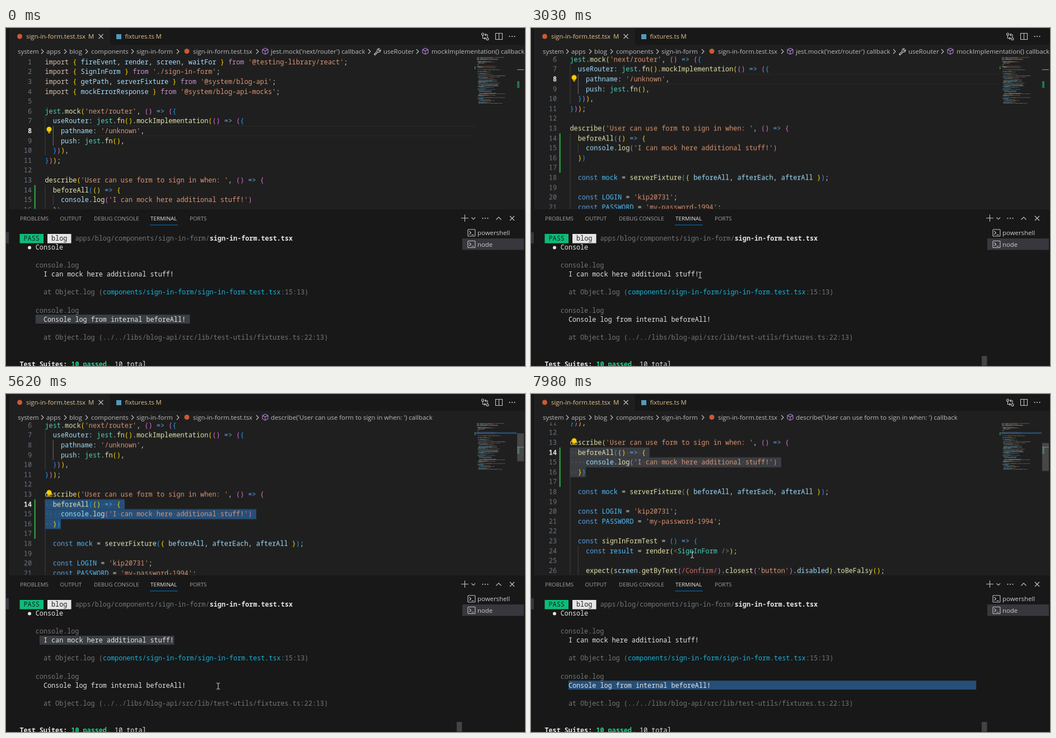
Animation of 927 by 604 pixels, one loop 8000 ms. Source, as an HTML page:

```html
<!DOCTYPE html>
<html lang="en">
<head>
<meta charset="utf-8">
<title>Editor and test output</title>
<style>
html, body { margin: 0; width: 100%; height: 100%; overflow: hidden; background: #181818; }
svg { display: block; width: 100vw; height: 100vh; }
text { white-space: pre; }
.ui { font-family: 'Open Sans', 'Noto Sans', sans-serif; font-size: 11.4px; fill: #bcbcbc; }
.tabs { font-family: 'Open Sans', 'Noto Sans', sans-serif; font-size: 9.85px; fill: #a2a2a2; }
.code { font: 500 11.87px 'Noto Sans Mono', 'DejaVu Sans Mono', monospace; fill: #d4d4d4; }
.term { font: 500 11.78px 'Noto Sans Mono', 'DejaVu Sans Mono', monospace; fill: #e5e5e5; }
.line { fill: none; stroke: #c5c5c5; stroke-width: 1.1; }
.mod { fill: #e2c08d; }
.cube { fill: none; stroke: #b180d7; stroke-width: 1.1; }

/* One loop is 8 s, so 1% is 80 ms. */
.k { animation: 8s step-end infinite; }
.scroll { animation-name: scroll; }
.before { animation-name: before; }
.caret16 { animation-name: caret16; }
.after { animation-name: after; }
.bulb8 { animation-name: bulb8; }
.bulb14 { animation-name: bulb14; }
.crumb1 { animation-name: crumb1; }
.crumb2 { animation-name: crumb2; }
.pick { animation-name: pick; }
.row16 { animation-name: row16; }
.row15 { animation-name: row15; }
.row14 { animation-name: row14; }
.slide { animation-name: slide; }
.thumb { animation-name: thumb; animation-timing-function: linear; }
.termbar { animation-name: termbar; }
.sel1 { animation-name: sel1; }
.sel2 { animation-name: sel2; transform-box: fill-box; transform-origin: right; }
.sel2 rect { animation-name: tint; }
.sel3 { animation-name: sel3; transform-box: fill-box; transform-origin: left; }
.mouse { animation-name: mouse; animation-timing-function: ease-in-out; }
.beam { animation-name: beam; }
.hand { animation-name: hand; }
.press { animation-name: press; }

@keyframes scroll {
  0% { transform: none; }
  6.25% { transform: translateY(-92.6px); }
  93.75% { transform: translateY(-185.2px); }
}
@keyframes slide {
  0% { transform: none; }
  6.25% { transform: translateY(17.5px); }
  93.75% { transform: translateY(35px); }
}
@keyframes thumb {
  0%, 3.5% { opacity: 0; }
  4.5%, 16% { opacity: 1; }
  24%, 49% { opacity: 0; }
  51%, 71% { opacity: 1; }
  77%, 91% { opacity: 0; }
  92%, 100% { opacity: 1; }
}
@keyframes before { 0% { opacity: 1; } 58% { opacity: 0; } }
@keyframes caret16 { 0% { opacity: 0; } 58% { opacity: 1; } 64.4% { opacity: 0; } }
@keyframes after { 0% { opacity: 0; } 64.4% { opacity: 1; } }
@keyframes bulb8 { 0% { opacity: 1; } 61% { opacity: 0; } }
@keyframes bulb14 { 0% { opacity: 0; } 66.2% { opacity: 1; } }
@keyframes crumb1 { 0% { opacity: 1; } 65.6% { opacity: 0; } }
@keyframes crumb2 { 0% { opacity: 0; } 65.6% { opacity: 1; } }
@keyframes pick { 0% { fill: #264f78; } 75% { fill: #3a3d41; } }
@keyframes row16 { 0% { opacity: 0; } 62.2% { opacity: 1; } }
@keyframes row15 { 0% { opacity: 0; } 63.4% { opacity: 1; } }
@keyframes row14 { 0% { opacity: 0; } 64.4% { opacity: 1; } }
@keyframes termbar { 0% { opacity: 0; } 16.5% { opacity: 1; } }
@keyframes sel1 { 0% { opacity: 1; } 22.5% { opacity: 0; } }
@keyframes sel2 {
  0% { transform: scaleX(0); }
  38.5% { transform: scaleX(0); animation-timing-function: steps(34); }
  42.5% { transform: none; }
  75% { transform: scaleX(0); }
}
@keyframes tint { 0% { fill: #264f78; } 58% { fill: #3a3d41; } }
@keyframes sel3 {
  0% { transform: scaleX(0); }
  77.5% { transform: scaleX(0); animation-timing-function: steps(36); }
  80.4% { transform: scaleX(.35); }
  80.8% { transform: none; }
}
@keyframes mouse {
  0%, 1% { transform: translate(893px, 588px); }
  5%, 11.6% { transform: translate(550px, 170px); }
  15.25% { transform: translate(253px, 375px); }
  18.75%, 24% { transform: translate(239px, 490px); }
  31.75%, 33.4% { transform: translate(322px, 447px); }
  37.5%, 38.3% { transform: translate(301px, 441px); }
  42.5%, 45.9% { transform: translate(58px, 443px); }
  55.1%, 57% { transform: translate(160px, 246px); }
  58%, 61% { transform: translate(155.5px, 238px); }
  64.8%, 67% { transform: translate(70px, 197px); }
  69.5% { transform: translate(419px, 521px); }
  70.25% { transform: translate(378px, 521.5px); }
  74.4%, 77.4% { transform: translate(69px, 521px); }
  80.6%, 83% { transform: translate(330px, 522px); }
  86.6%, 87.9% { transform: translate(178px, 429.5px); }
  92.5%, 98% { transform: translate(287px, 297px); }
  99.6%, 100% { transform: translate(287px, 287px); }
}
@keyframes beam { 0% { opacity: 0; } 1% { opacity: 1; } 14.4% { opacity: 0; } 16.4% { opacity: 1; } }
@keyframes hand { 0% { opacity: 0; } 14.4% { opacity: 1; } 16.4% { opacity: 0; } }
@keyframes press {
  0% { opacity: 0; }
  22.5% { opacity: 1; } 23.5% { opacity: 0; }
  38.2% { opacity: 1; } 44% { opacity: 0; }
  58% { opacity: 1; } 65.4% { opacity: 0; }
  74.8% { opacity: 1; } 82.6% { opacity: 0; }
}
</style>
</head>
<body>
<svg viewBox="0 0 927 604">
  <defs>
    <clipPath id="pane"><rect x="6" y="51.5" width="921" height="271.5"/></clipPath>
    <path id="cube" class="cube" d="M0-5.5L5-3V3L0 5.5L-5 3V-3ZM-5-3L0-.4L5-3M0-.4V5.5"/>
    <path id="next" class="line" d="M-2-4l4 4-4 4"/>
    <g id="bulb" fill="#fc0"><circle r="4.5"/><path d="M-1.8 3h3.6v4h-3.600z"/><path d="M-2 5h4" stroke="#1f1f1f" stroke-width=".8"/></g>
    <g id="shell" class="line"><rect x="-6.5" y="-6" width="13" height="12" rx="1"/><path d="M-4-3l3 3-3 3M0 3.5h4"/></g>
    <g id="dots" fill="#c5c5c5"><circle cx="-4.5" r="1.1"/><circle r="1.1"/><circle cx="4.5" r="1.1"/></g>
  </defs>

  <rect width="927" height="604" fill="#181818"/>
  <path d="M6 0H185V31H927V323H6Z" fill="#1f1f1f"/>
  <path d="M185 0V31H927M6 323.5H927" fill="none" stroke="#222"/>
  <rect y="365" width="5" height="20" fill="#37373d"/>

  <g class="ui">
    <circle cx="24.5" cy="15" r="4.5" fill="#cb5a32"/>
    <g class="mod">
      <text x="36" y="19.3">sign-in-form.test.tsx</text><text x="147" y="19.3">M</text>
      <text x="212.5" y="19.3">fixtures.ts</text><text x="267.5" y="19.3">M</text>
    </g>
    <path class="line" d="M165.5 11l8 8m0-8l-8 8"/>
    <rect x="197" y="11" width="9" height="9" fill="#519aba"/>
    <g class="line">
      <circle cx="851.5" cy="11" r="2"/><circle cx="860" cy="19.5" r="2"/>
      <path d="M851.5 13v5.5h5m-2-2l2 2-2 2M860 17.5V12h-4.5m2-2l-2 2 2 2"/>
      <path d="M874.5 9.5h12v11h-12zM880.5 9.5v11"/>
    </g>
    <use href="#dots" x="904" y="15"/>
    <g id="path"></g>
    <circle cx="323" cy="41.5" r="4.5" fill="#cb5a32"/>
    <use href="#cube" x="463" y="41.5"/>
    <g class="k crumb1">
      <text x="473" y="46">jest.mock('next/router') callback</text>
      <use href="#next" x="649" y="42"/>
      <path class="line" d="M657.5 47l5.500-5.500a3.300 3.300 0 0 1 4-4.500l-2 2.200 1.800 1.800 2.200-2a3.300 3.300 0 0 1-4.500 4l-5.500 5.500z"/>
      <text x="674" y="46">useRouter</text>
      <use href="#next" x="735" y="42"/><use href="#cube" x="749" y="41.5"/>
      <text x="760" y="46">mockImplementation() callback</text>
    </g>
    <text class="k crumb2" x="473" y="46">describe('User can use form to sign in when: ') callback</text>
  </g>

  <g clip-path="url(#pane)">
    <g class="k scroll code">
      <g id="under"></g>
      <g id="code"></g>
      <use class="k bulb8" href="#bulb" x="77" y="181"/>
      <use class="k bulb14" href="#bulb" x="77" y="268.7"/>
    </g>
  </g>
  <g id="map"></g>
  <rect x="837" y="68.5" width="1.5" height="5" fill="#2ea043"/>
  <rect class="k row14" x="838" y="68.5" width="74" height="2.6" fill="#264f78"/>
  <rect x="913" y="95" width="4" height="12" fill="#23754f"/>
  <g stroke="#a0a0a0">
    <path class="k before" d="M913 74.5h12"/>
    <path class="k caret16" d="M913 102h12"/>
    <path class="k after" d="M913 95h12"/>
  </g>
  <g class="k slide"><rect class="k thumb" x="913" y="52.5" width="12" height="50" fill="#797979" fill-opacity=".45"/></g>

  <g class="tabs">
    <text x="25" y="343.5">PROBLEMS</text><text x="96.5" y="343.5">OUTPUT</text>
    <text x="157" y="343.5">DEBUG CONSOLE</text><text x="258" y="343.5" fill="#e7e7e7">TERMINAL</text>
    <text x="328" y="343.5">PORTS</text>
  </g>
  <path d="M257 352h50" stroke="#0078d4"/>
  <path class="line" d="M819.5 333.5v12.500M813 339.700h13M831.500 338.500l3.300 3.300 3.300-3.300M875.500 342.500l4.500-4.500 4.500 4.500M900 336l8 8m0-8l-8 8"/>
  <use href="#dots" x="856" y="340"/>
  <rect x="815" y="376" width="110" height="20.5" fill="#37373d"/>
  <use href="#shell" x="831.5" y="366"/><use href="#shell" x="831.5" y="386.5"/>
  <g class="ui"><text x="842" y="370.3" fill="#ccc">powershell</text><text x="842" y="390.8" fill="#ccc">node</text></g>

  <rect x="24.5" y="368" width="42.5" height="16.6" fill="#0dbc79"/>
  <rect x="74" y="368" width="42.5" height="16.6" fill="#e5e5e5"/>
  <circle cx="42" cy="392.5" r="3" fill="#e2e2e2"/>
  <rect class="k sel1" x="52.8" y="512.2" width="275.7" height="16" fill="#3a3d41"/>
  <g class="k sel2"><rect class="k" x="59.9" y="432" width="240.4" height="16"/></g>
  <rect class="k sel3" x="67" y="512.2" width="728.2" height="16" fill="#264f78"/>
  <g id="term" class="term"></g>
  <rect class="k termbar" x="805" y="586" width="9.5" height="17.5" fill="#434343"/>

  <g class="k mouse">
    <circle class="k press" r="7.7" fill="#aaa014"/>
    <path class="k beam" d="M-2-5q3 0 3 1.500q0-1.500 3-1.500M1-4V5M-2 6q3 0 3-1.500q0 1.500 3 1.500" fill="none" stroke="#e0e0e0"/>
    <path class="k hand" d="M-2.500-7q1.500-1.700 3 0v5l4 1.200q1.700.6 1.300 2.800l-1 4q-.5 2-2.300 2h-3q-1.500 0-2.500-1.500l-3-4.500q0-2 2-1.200l1.500 1z" fill="#fff" stroke="#222" stroke-width=".6"/>
  </g>
</svg>

<script>
const CODE = `import { fireEvent, render, screen, waitFor } from '@testing-library/react';
import { SignInForm } from './sign-in-form';
import { getPath, serverFixture } from '@system/blog-api';
import { mockErrorResponse } from '@system/blog-api-mocks';

jest.mock('next/router', () => ({
  useRouter: jest.fn().mockImplementation(() => ({
    pathname: '/unknown',
    push: jest.fn(),
  })),
}));

describe('User can use form to sign in when: ', () => {
  beforeAll(() => {
    console.log('I can mock here additional stuff!')
  })

  const mock = serverFixture({ beforeAll, afterEach, afterAll });

  const LOGIN = 'kip20731';
  const PASSWORD = 'my-password-1994';

  const signInFormTest = () => {
    const result = render(<SignInForm />);

    expect(screen.getByText(/Confirm/).closest('button').disabled).toBeFalsy();`.split('\n');

const LEFT = 69.5, TOP = 52, CHAR = 7.122, ROW = 17.6;
const $ = id => document.getElementById(id);
const lineTop = n => TOP + (n - 1) * ROW;

function add(parent, tag, attrs, text) {
  const node = document.createElementNS('http://www.w3.org/2000/svg', tag);
  for (const key in attrs) node.setAttribute(key, attrs[key]);
  if (text !== undefined) node.textContent = text;
  parent.append(node);
  return node;
}

const WORDS = { import: '#d8c0b0', from: '#cd8fc8', const: '#5ba5e6', jest: '#4ed4b8', signInFormTest: '#e6e6b0' };
const BRACKETS = ['#ffd700', '#da70d6', '#179fff'];
let depth = 0;

function colour(word, before, after) {
  if (word[0] === "'") return '#dc9574';
  if (/^\/\w/.test(word)) return '#d96a6a';
  if (word === '=>') return '#5ba5e6';
  if (word === '<' || word === '/>') return '#808080';
  if (/[{(]/.test(word)) return BRACKETS[depth++ % 3];
  if (/[})]/.test(word)) return BRACKETS[--depth % 3];
  if (!/\w/.test(word)) return '#d4d4d4';
  if (WORDS[word]) return WORDS[word];
  if (before.endsWith('<')) return '#4ed4b8';
  if (after[0] === '(') return '#e6e6b0';
  if (before.endsWith('const ') || /^[A-Z]+$/.test(word)) return '#4fc1ff';
  return '#a2e0ff';
}

function tokens(line) {
  return [...line.matchAll(/'[^']*'|\/\w+\/|=>|\/>|\w+|\S/g)].map(m => {
    const end = m.index + m[0].length;
    return { at: m.index, word: m[0], fill: colour(m[0], line.slice(0, m.index), line.slice(end)) };
  });
}

function mapBar(row, at, size, fill) {
  add($('map'), 'rect', { x: 841 + at * .645, y: 52.3 + row * 1.3, width: size * .645, height: .8, fill, opacity: .5 });
}

function number(n, attrs) {
  add($('code'), 'text', { x: 46, y: lineTop(n) + 12.8, 'text-anchor': 'end', fill: '#6e7681', ...attrs }, n);
}

// Current-line frames and the strong line number of each phase
const border = (n, cls) => add($('under'), 'path',
  { d: `M84 ${lineTop(n)}H839M84 ${lineTop(n) + ROW}H839`, stroke: '#2a2a2a', class: 'k ' + cls });
border(8, 'before');
border(16, 'caret16');

for (const [n, size] of [[14, 20], [15, 53], [16, 4]]) {
  const row = add($('under'), 'g', { class: 'k row' + n });
  add(row, 'rect', { class: 'k pick', x: LEFT, y: lineTop(n), width: size * CHAR, height: ROW + .3 });
  const dots = CODE[n - 1].replace(/\S/g, '_').replace(/ /g, '·').replace(/_/g, ' ');
  add(row, 'text', { x: LEFT, y: lineTop(n) + 12.8, fill: '#fff', opacity: .22 }, dots);
}

const guide = (col, from, to, stroke = '#404040') => add($('under'), 'path',
  { d: `M${LEFT + .5 + col * CHAR} ${lineTop(from)}V${lineTop(to + 1)}`, stroke });
guide(0, 7, 10);
guide(2, 8, 9, '#707070');
guide(0, 14, 26);
guide(2, 15, 15);
guide(2, 24, 26);
add($('under'), 'rect', { x: 50.5, y: lineTop(14), width: 2.3, height: 4 * ROW, fill: '#2ea043' });

const phases = { 8: 'before', 16: 'caret16', 14: 'after' };
CODE.forEach((line, i) => {
  const n = i + 1;
  number(n);
  if (phases[n]) number(n, { fill: '#e0e0e0', 'font-weight': 600, class: 'k ' + phases[n] });
  const text = add($('code'), 'text', { x: LEFT, y: lineTop(n) + 12.8 });
  let end = 0;
  for (const { at, word, fill } of tokens(line)) {
    if (at > end) text.append(line.slice(end, at));
    add(text, 'tspan', { fill }, word);
    mapBar(i, at, word.length, fill);
    end = at + word.length;
  }
});
add($('code'), 'path', { class: 'k caret16', d: `M98.5 ${lineTop(16)}v${ROW}`, stroke: '#ddd', 'stroke-width': 1.3 });

// The rest of the file is only seen in the minimap
let seed = 7;
const random = () => (seed = seed * 16807 % 2147483647) / 2147483647;
const tints = ['#dcdcaa', '#9cdcfe', '#ce9178', '#4fc1ff'];
for (let row = 27; row < 64; row++) {
  if (row % 6 === 0) continue;
  let at = 2 + 2 * Math.floor(random() * 3);
  for (let k = 1 + random() * 4; k > 0; k--) {
    const size = 4 + random() * 14;
    mapBar(row, at, size, tints[Math.floor(random() * 4)]);
    at += size + 1;
  }
}

for (const x of [65, 106, 144, 226, 307, 449]) add($('path'), 'use', { href: '#next', x, y: 42 });
for (const [x, name] of [[21, 'system'], [72, 'apps'], [113, 'blog'], [152, 'components'],
  [233, 'sign-in-form'], [334, 'sign-in-form.test.tsx']]) add($('path'), 'text', { x, y: 46 }, name);

const GREY = '#767676', CYAN = '#14b4dc', WHITE = '#e5e5e5';
const print = (row, col, text, fill = WHITE, weight = 500) => add($('term'), 'text',
  { x: 24.5 + col * 7.068, y: 380 + row * 16.07, fill, 'font-weight': weight }, text);
print(0, 1, 'PASS', '#10281e');
print(0, 8, 'blog', '#222');
print(0, 14, 'apps/blog/components/sign-in-form/', GREY);
print(0, 48, 'sign-in-form.test.tsx', WHITE, 700);
print(1, 4, 'Console');
print(3, 4, 'console.log', GREY);
print(4, 6, 'I can mock here additional stuff!');
print(6, 6, 'at Object.log (', GREY);
print(6, 21, 'components/sign-in-form/sign-in-form.test.tsx', CYAN);
print(6, 66, ':15:13)', GREY);
print(8, 4, 'console.log', GREY);
print(9, 6, 'Console log from internal beforeAll!');
print(11, 6, 'at Object.log (../../libs/blog-api/src/lib/test-utils/fixtures.ts:22:13)', GREY);
print(14, 0, 'Test Suites:', WHITE, 700);
print(14, 13, '10 passed', '#23d18b', 700);
print(14, 22, ', 10 total');
</script>
</body>
</html>
```
